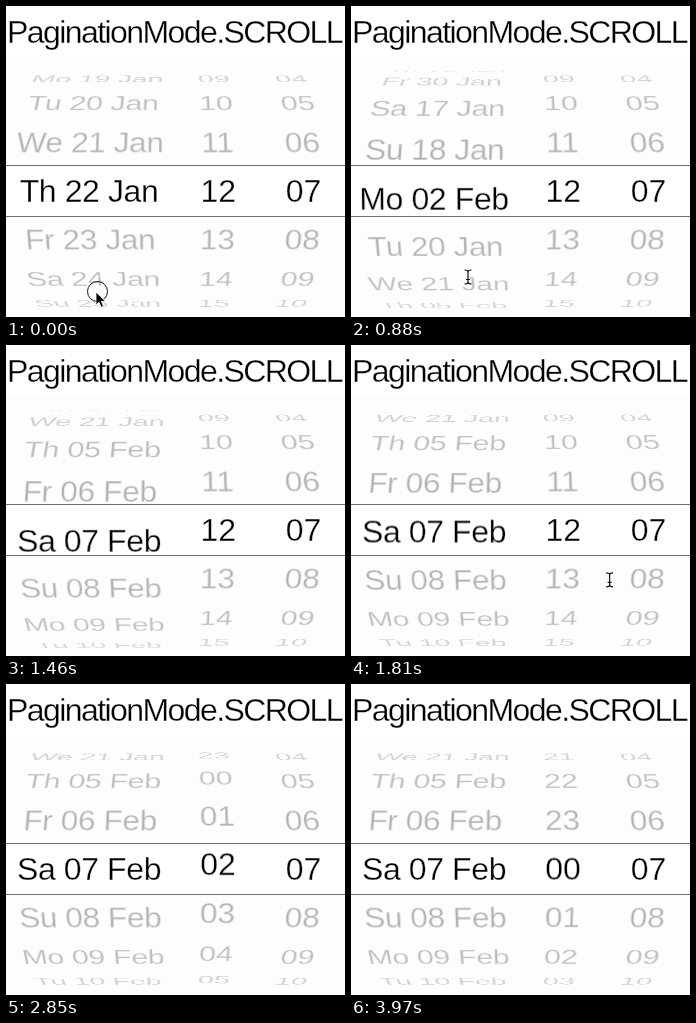
Animation, 339 px wide and 311 px high, one loop 4.04 s. Source, as an HTML page:

```html
<!DOCTYPE html>
<html lang="en">
<head>
<meta charset="utf-8">
<title>Date wheel</title>
<style>
  html, body { margin: 0; width: 100%; height: 100%; overflow: hidden; background: #fff; }
  #stage {
    position: relative; width: 339px; height: 311px; overflow: hidden; background: #fff;
    font-family: "Liberation Sans", Arial, Helvetica, sans-serif; color: #000;
    -webkit-text-stroke: .35px #fff;
  }
  #stage > * { position: absolute; left: 0; }
  h1 {
    margin: 0; top: 5.500px; left: 1px !important; white-space: nowrap;
    font: 400 32px/40px "Liberation Sans", Arial, Helvetica, sans-serif; letter-spacing: -1.580px;
  }
  #wheels { top: 0; width: 339px; height: 311px; perspective: 648px; perspective-origin: 169.5px 185.5px; }
  .row {
    position: absolute; top: 165.2px; width: 180px; height: 40px;
    font-size: 32px; line-height: 40px; text-align: center; white-space: nowrap;
  }
  .veil { width: 339px; background: rgba(252, 252, 252, .69); }
  .line { width: 339px; height: 1px; background: #6e6e6e; }
  svg { top: 0; }
</style>
</head>
<body>
<div id="stage">
  <h1>PaginationMode.SCROLL</h1>
  <div id="wheels"></div>
  <div class="veil" style="top:52px;height:107px"></div>
  <div class="veil" style="top:211px;height:100px"></div>
  <div class="line" style="top:159px"></div>
  <div class="line" style="top:210px"></div>
  <svg width="339" height="311" viewBox="0 0 339 311">
    <g id="cursor">
      <circle id="press" r="10" fill="none" stroke="#111"/>
      <path id="arrow" d="M-1.500 .5V13.500L1.500 10.700L3.700 15.700L6 14.700L3.800 9.800H8Z" fill="#000" stroke="#fff" stroke-width=".8"/>
      <g id="beam" fill="none">
        <path d="M-3.500 -7Q0 -7 0 -5Q0 -7 3.500 -7M0 -5V5M-3.500 7Q0 7 0 5Q0 7 3.500 7M-2 2.500H2" stroke="#fff" stroke-width="2.600"/>
        <path d="M-3.500 -7Q0 -7 0 -5Q0 -7 3.500 -7M0 -5V5M-3.500 7Q0 7 0 5Q0 7 3.500 7M-2 2.500H2" stroke="#111" stroke-width="1.200"/>
      </g>
    </g>
  </svg>
</div>
<script>
const LOOP = 4040, RADIUS = 144, STEP = 20, REACH = 4, EDGE = 79, ROW_PX = 50;
const $ = id => document.getElementById(id);
const pad = n => String(n).padStart(2, '0');
const mod = (n, m) => ((n % m) + m) % m;
const clamp = u => Math.max(0, Math.min(1, u));
const mix = (a, b, u) => a + (b - a) * u;

const WEEKDAYS = ['Su', 'Mo', 'Tu', 'We', 'Th', 'Fr', 'Sa'];
const MONTHS = ['Jan', 'Feb'];
const LATE_LABELS = [9, 10, 12, 13];  // these rows show the date two weeks earlier

function dayLabel(n) {
  const shown = LATE_LABELS.includes(n) ? n - 14 : n;
  const d = new Date(Date.UTC(2015, 0, 22 + shown));
  return `${WEEKDAYS[d.getUTCDay()]} ${pad(d.getUTCDate())} ${MONTHS[d.getUTCMonth()]}`;
}

// A drag that speeds up, then momentum that dies away.
function flick({ from, to, start, release, dragged, tau }, t) {
  const dir = Math.sign(to - from);
  if (t < release) return from + dir * dragged * clamp((t - start) / (release - start)) ** 3;
  const left = Math.abs(to - from) - dragged;
  return to - dir * left * Math.exp((release - t) / tau);
}

const DAY = { from: 0, to: 16, start: 450, release: 720, dragged: 3.57, tau: 183 };
const HOUR = { from: 12, to: 0, start: 2120, release: 2570, dragged: 2.8, tau: 190 };

const columns = [
  { x: 83, spacing: -.4, label: dayLabel, at: t => flick(DAY, t) },
  { x: 212.3, spacing: 0, label: n => pad(mod(n, 24)), at: t => flick(HOUR, t) },
  { x: 297.5, spacing: 0, label: n => pad(mod(n, 60)), at: () => 7 }
];

for (const col of columns) {
  col.rows = Array.from({ length: 2 * REACH + 1 }, () => {
    const row = document.createElement('div');
    row.className = 'row';
    row.style.left = col.x - 90 + 'px';
    row.style.letterSpacing = col.spacing + 'px';
    $('wheels').append(row);
    return row;
  });
}

function drawColumn(col, t) {
  const pos = col.at(t), mid = Math.round(pos);
  col.rows.forEach((row, i) => {
    const n = mid + i - REACH, angle = (n - pos) * STEP;
    const text = col.label(n);
    if (row.textContent !== text) row.textContent = text;
    const seen = Math.abs(angle) < EDGE;
    row.style.visibility = seen ? 'visible' : 'hidden';
    row.style.opacity = seen ? Math.cos(angle * Math.PI / 180) ** .8 : 0;
    row.style.transform = `translateZ(${-RADIUS}px) rotateX(${-angle}deg) translateZ(${RADIUS}px)`;
  });
}

// Pointer position, or null while it is off the stage.
function pointer(t) {
  const dayY = p => 285.5 - ROW_PX * p;
  const hourY = p => 155.5 + ROW_PX * (12 - p);
  if (t < DAY.release) {
    const p = flick(DAY, t);
    return [91.5 + 4 * p, dayY(p)];
  }
  if (t < 1000) {
    const u = clamp((t - DAY.release) / 150);
    return [mix(106, 117, u), mix(dayY(DAY.dragged), 271, u)];
  }
  if (t < 1700) return null;
  if (t < HOUR.start) {
    const u = clamp((t - 1700) / 360), e = u * u * (3 - 2 * u);
    return [mix(272, 213, e), mix(258, 155.5, e)];
  }
  if (t < 2630) {
    const p = flick(HOUR, Math.min(t, HOUR.release));
    return [213 + 11 * (12 - p), hourY(p)];
  }
  return null;
}

const show = (id, on) => $(id).setAttribute('visibility', on ? 'visible' : 'hidden');

function drawPointer(t) {
  const at = pointer(t);
  const held = f => t >= f.start && t < f.release;
  if (at) $('cursor').setAttribute('transform', `translate(${at[0]} ${at[1]})`);
  show('press', at && (t < 60 || held(DAY) && t >= 470 || held(HOUR)));
  show('arrow', at && t < 470);
  show('beam', at && t >= 470);
}

function draw(t) {
  columns.forEach(col => drawColumn(col, t));
  drawPointer(t);
}

const began = performance.now();
function tick() {
  draw((performance.now() - began) % LOOP);
  requestAnimationFrame(tick);
}
tick();
</script>
</body>
</html>
```
